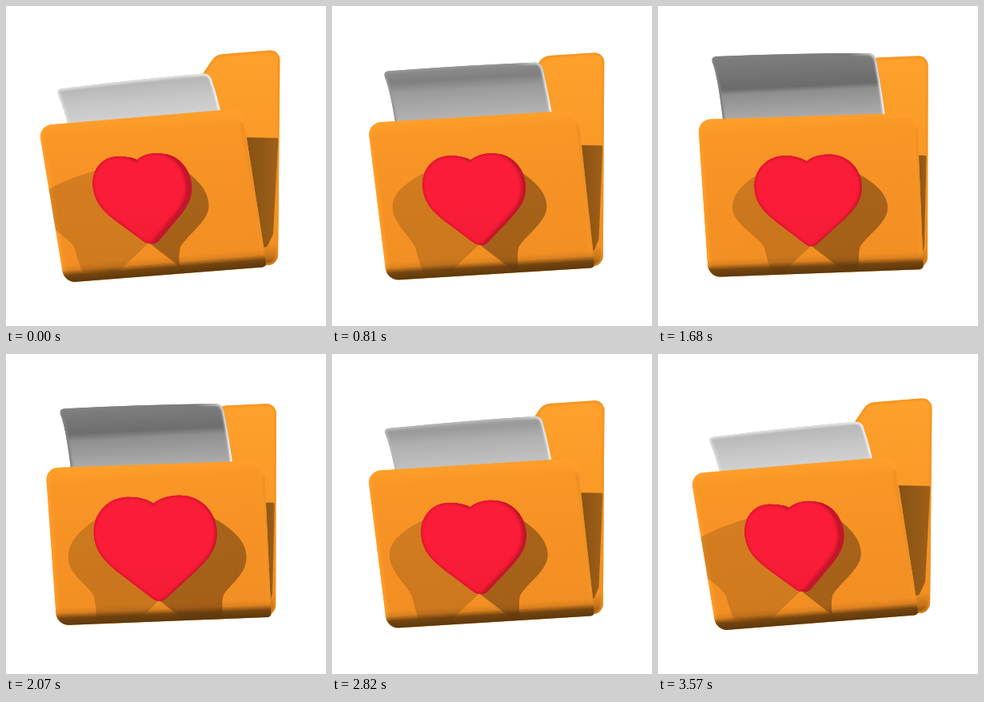
An HTML page with a canvas for the animation above (3.6 s loop, 400 by 400 pixels).

```html
<!DOCTYPE html>
<html lang="en">
<head>
<meta charset="utf-8">
<title>Favourites folder</title>
<style>
html, body { margin: 0; width: 100%; height: 100%; overflow: hidden; background: #fff; }
canvas { display: block; width: 400px; height: 400px; }
</style>
</head>
<body>
<canvas id="stage" width="400" height="400"></canvas>
<script>
const ctx = document.getElementById('stage').getContext('2d');
const LOOP = 3600, STEP = 30, BEAT = 900;
const mix = (a, b, k) => a + (b - a) * k;
const wave = (t, period, peak) => (1 + Math.cos(2 * Math.PI * (t - peak) / period)) / 2;
const gray = v => `rgb(${v},${v},${v})`;

// Corners are [x, y, radius]
function roundedPoly(corners) {
  const path = new Path2D();
  const n = corners.length, first = corners[0], last = corners[n - 1];
  path.moveTo((first[0] + last[0]) / 2, (first[1] + last[1]) / 2);
  corners.forEach(([x, y, r], i) => {
    const next = corners[(i + 1) % n];
    path.arcTo(x, y, next[0], next[1], r);
  });
  path.closePath();
  return path;
}

function gradient(x0, y0, x1, y1, ...stops) {
  const g = ctx.createLinearGradient(x0, y0, x1, y1);
  stops.forEach(([at, color]) => g.addColorStop(at, color));
  return g;
}

function fill(path, style) {
  ctx.fillStyle = style;
  ctx.fill(path);
}

// Soft band along the inside of a path
function rim(path, color, width, blur) {
  ctx.save();
  ctx.clip(path);
  ctx.filter = `blur(${blur}px)`;
  ctx.strokeStyle = color;
  ctx.lineWidth = width;
  ctx.stroke(path);
  ctx.restore();
}

const heartShape = new Path2D(
  'M0-.42C.06-.465 .14-.49 .24-.49C.43-.49 .575-.34 .575-.15C.575 0 .5 .1 .36 .22L.06 .47' +
  'Q0 .52-.06 .47L-.36 .22C-.5 .1-.575 0-.575-.15C-.575-.34-.43-.49-.24-.49C-.14-.49-.06-.465 0-.42Z');

function drawBack(turn) {
  const at = (a, b) => mix(a, b, turn);
  const right = at(342.5, 337.5), top = at(54.5, 62), foot = at(325, 328);
  const back = roundedPoly([
    [at(244, 258), at(88, 78), 4], [at(262, 267), at(61, 65), 18],
    [right, top, 12], [at(340, 337), foot - 1, 13],
    [300, foot - 1, 2], [240, 300, 2]
  ]);
  fill(back, gradient(0, top, 0, foot, [0, '#ffa12c'], [.4, '#fb9a27'], [.9, '#f09023'], [.96, '#c47219'], [1, '#74450f']));
  rim(back, '#f0921f', 4, 1.5);

  const inner = roundedPoly([
    [290, at(164, 187), 1], [right - 2, at(165, 187), 2],
    [at(334, 333), at(285, 300), 6], [at(326, 329), at(302, 314), 5], [300, 300, 1]
  ]);
  fill(inner, gradient(at(302, 322), 0, right, 0, [0, '#885213'], [.6, '#965a17'], [1, '#a1621a']));
}

function drawPaper(turn, lift) {
  const at = (a, b) => mix(a, b, turn);
  const leftTop = 104 - 41 * lift, rightTop = 85 - 26 * lift;
  const x0 = at(64, 70) - 3 * lift, x1 = at(256, 273) - 1.5 * lift;
  const paper = new Path2D();
  paper.moveTo(at(78, 82), 150);
  paper.quadraticCurveTo(x0 + 8, leftTop + 24, x0 + 1, leftTop + 7);
  paper.quadraticCurveTo(x0 - 1, leftTop, x0 + 7, leftTop);
  paper.quadraticCurveTo((x0 + x1) / 2, mix(leftTop, rightTop, .5) - 2, x1 - 10, rightTop);
  paper.quadraticCurveTo(x1, rightTop - 1, x1 + 2, rightTop + 11);
  paper.quadraticCurveTo(at(264, 281), 112, at(271, 285), 145);
  paper.closePath();

  // The fold shadow deepens and slides down as the sheet rises
  const depth = Math.sin(lift * Math.PI / 2);
  const tone = (low, high) => gray(mix(low, high, depth));
  const fold = mix(.12, .5, lift * lift);
  fill(paper, gradient(150, (leftTop + rightTop) / 2, 154, 142,
    [0, tone(190, 126)], [fold, tone(186, 108)],
    [fold + mix(.36, .08, lift), tone(198, 142)], [1, tone(210, 172)]));
  rim(paper, gradient(x0, 0, x1 + 10, 0,
    [0, tone(220, 130)], [.8, tone(228, 122)], [1, '#f4f4f4']), 5, 1.2);
}

function drawHeartShadows(turn, beat, cx, cy, h, floor) {
  const tipX = cx + mix(.08, .03, turn) * h, tipY = cy + .49 * h;
  const side = (sign, wide, waist, flare, run, alpha) => {
    const x = k => cx + sign * k * h, y = k => cy + k * h;
    const path = new Path2D();
    path.moveTo(x(.47), y(-.33));
    path.bezierCurveTo(x(mix(.47, wide, .5)), y(-.22), x(wide), y(-.1), x(wide), y(.08));
    path.bezierCurveTo(x(wide), y(.25), x(waist + .06), 288, x(waist), 302);
    path.quadraticCurveTo(x(waist - .02), 312, x(waist) + flare, floor);
    path.lineTo(tipX + sign * (floor - tipY) * run, floor);
    path.lineTo(tipX, tipY);
    path.lineTo(cx, cy);
    path.closePath();
    fill(path, `rgba(35,18,8,${alpha})`);
  };
  side(-1, .82 + .35 * (1 - turn) ** 3, .75 + .19 * beat - .31 * turn, 10 * (1 - beat), 1.05, .17 + .03 * turn);
  side(1, .75 + .11 * turn, .43 + .17 * beat + .1 * turn, 0, 1.3, .37);
}

function drawFront(turn, beat) {
  const at = (a, b) => mix(a, b, turn);
  const tl = [at(40.5, 50), at(149.5, 142), 15], tr = [at(295, 324), at(128, 133.5), 15];
  const br = [at(326, 332), at(326, 329), 5], bl = [at(73, 63), at(346, 339), 16];
  const front = roundedPoly([tl, tr, br, bl]);
  const hx = at(169.5, 188), hy = at(241, 243);
  const h = (112 + 36 * beat) * at(1, .98);

  fill(front, gradient(170, 138, 182, at(336, 334),
    [0, '#ffa02b'], [.1, '#f99626'], [.6, '#f59124'], [1, '#f18e23']));
  rim(front, '#ff9f2b', 6, 2);

  ctx.save();
  ctx.clip(front);
  drawHeartShadows(turn, beat, hx, hy, h, 332);

  // Rounded right edge and underside
  ctx.filter = 'blur(1.5px)';
  ctx.strokeStyle = 'rgba(205,118,28,.45)';
  ctx.lineWidth = 3;
  ctx.beginPath();
  ctx.moveTo(tr[0], tr[1] + 18);
  ctx.lineTo(br[0], br[1]);
  ctx.stroke();
  ctx.filter = 'none';
  const midX = (bl[0] + br[0]) / 2, midY = (bl[1] + br[1]) / 2;
  const slope = (br[1] - bl[1]) / (br[0] - bl[0]);
  ctx.fillStyle = gradient(midX + 22 * slope, midY - 22, midX, midY,
    [0, 'rgba(95,56,12,0)'], [.3, 'rgba(95,56,12,.15)'], [.6, 'rgba(95,56,12,.85)'], [1, '#5b380d']);
  ctx.fillRect(0, 280, 400, 80);
  ctx.restore();

  drawHeart(turn, hx, hy, h);
}

function drawHeart(turn, cx, cy, h) {
  const shape = (dx, dy) => {
    const placed = new Path2D();
    placed.addPath(heartShape, new DOMMatrix([
      mix(.9, 1, turn) * h, mix(-.075, -.03, turn) * h,
      mix(.16, .055, turn) * h, h, cx + dx, cy + dy
    ]));
    return placed;
  };
  for (let d = mix(7, 1.5, turn); d > 0; d -= 1) fill(shape(d, d * .1), '#c5162c');
  const face = shape(0, 0);
  fill(face, gradient(0, cy - h / 2, 0, cy + h / 2, [0, '#fa1d38'], [.5, '#fb1d37'], [1, '#f51b35']));
  rim(face, 'rgba(215,20,46,.75)', 4, 1.2);
}

function draw(now) {
  const t = Math.floor(now % LOOP / STEP) * STEP;
  const turn = wave(t, LOOP, LOOP / 2);
  const lift = wave(t, LOOP, 1650);
  const beat = wave(t, BEAT, BEAT / 2);
  ctx.clearRect(0, 0, 400, 400);
  drawBack(turn);
  drawPaper(turn, lift);
  drawFront(turn, beat);
}

let start;
function frame(now) {
  start ??= now;
  draw(Math.max(0, now - start));
  requestAnimationFrame(frame);
}
draw(0);
requestAnimationFrame(frame);
</script>
</body>
</html>
```
